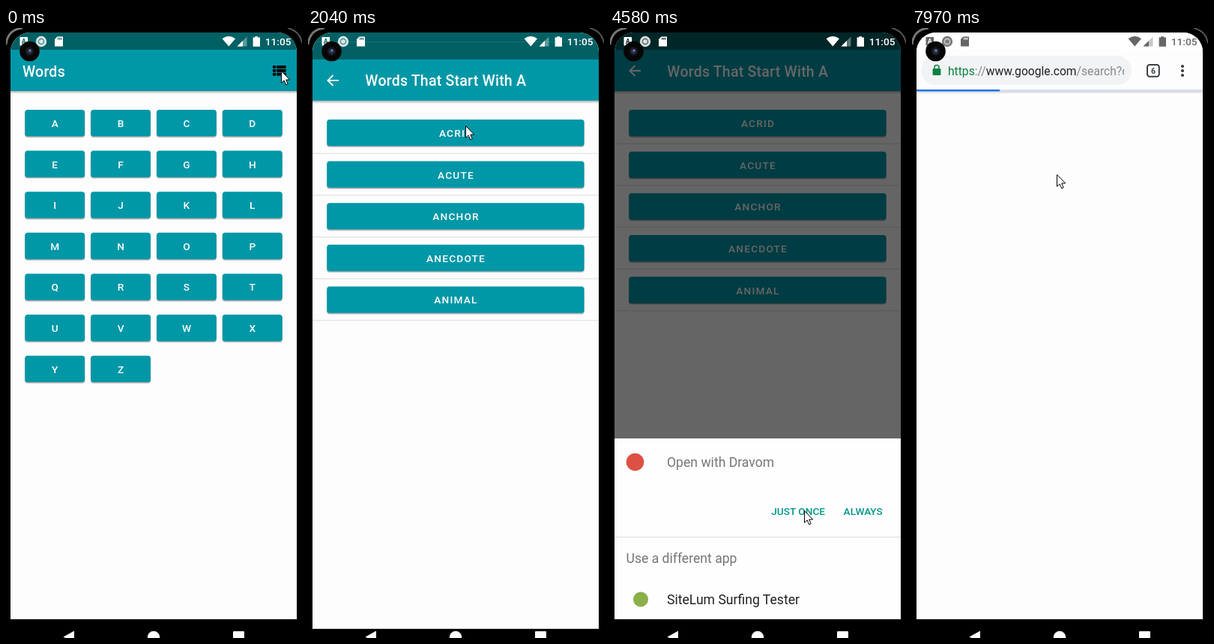
An HTML page that plays this animation: 395 px wide and 813 px high, repeating every 8 s.

```html
<!DOCTYPE html>
<html lang="en">
<head>
<meta charset="utf-8">
<title>Words app</title>
<style>
html, body { margin: 0; width: 100%; height: 100%; overflow: hidden; background: #000; }
svg { display: block; width: 100vw; height: 100vh; }
text { font-family: Roboto, sans-serif; white-space: pre; }
</style>
</head>
<body>
<svg id="stage" viewBox="0 0 395 813">
  <defs>
    <clipPath id="screen"><path d="M6 813V32A26 26 0 0 1 32 6H362A26 26 0 0 1 388 32V813Z"/></clipPath>
    <clipPath id="urlBox"><rect x="20" y="40" width="263" height="34"/></clipPath>
    <linearGradient id="shade" x2="0" y2="1">
      <stop offset="0" stop-color="#000" stop-opacity=".3"/>
      <stop offset="1" stop-color="#000" stop-opacity="0"/>
    </linearGradient>
  </defs>
  <g id="view"></g>
</svg>
<script>
const LOOP = 8000;
const TEAL = '#0097a7', DARK_TEAL = '#006064', PAGE = '#fdfdfd';
const WORDS = ['ACRID', 'ACUTE', 'ANCHOR', 'ANECDOTE', 'ANIMAL'];

const STEPS = [0, 810, 1080, 1230, 1350, 1500, 1650, 1800, 1920, 2040, 2170, 2310, 2430,
  2550, 2670, 3070, 3190, 3320, 3440, 3590, 3740, 3860, 3980, 4100, 4220, 4340, 4460, 4580,
  5390, 5630, 5750, 5890, 6030, 6150, 6280, 6400, 6960, 7110, 7230, 7380, 7500, 7670, 7820, 7970];

// Pointer path: time, x, y
const POINTER = [[0, 367, 57], [1080, 367, 57], [1350, 207, 133], [1500, 206, 132],
  [1650, 206, 131], [1800, 210, 130], [2170, 210, 130], [2430, 232, 162], [2670, 206, 185],
  [3070, 206, 185], [3440, 210, 185], [3590, 210, 221], [4340, 262, 643], [4580, 259, 643],
  [5390, 259, 643], [5750, 257, 643], [6400, 171, 374], [6960, 171, 374], [7230, 173, 367],
  [7500, 178, 339], [7670, 181, 289], [7820, 187, 241], [7970, 193, 195], [8000, 193, 195]];

const clamp = v => Math.max(0, Math.min(1, v));
const ramp = (t, a, b) => clamp((t - a) / (b - a));

const rect = (x, y, w, h, fill, more = '') =>
  `<rect x="${x}" y="${y}" width="${w}" height="${h}" fill="${fill}" ${more}/>`;
const circle = (x, y, r, fill, more = '') =>
  `<circle cx="${x}" cy="${y}" r="${r}" fill="${fill}" ${more}/>`;
const path = (d, fill, more = '') => `<path d="${d}" fill="${fill}" ${more}/>`;
const text = (x, y, size, fill, str, more = '') =>
  `<text x="${x}" y="${y}" font-size="${size}" fill="${fill}" ${more}>${str}</text>`;
const group = (body, more) => `<g ${more}>${body}</g>`;

function pointerAt(t) {
  const i = POINTER.findIndex(p => p[0] > t);
  const [a, b] = [POINTER[i - 1], POINTER[i]];
  const k = ramp(t, a[0], b[0]);
  return [a[1] + (b[1] - a[1]) * k, a[2] + (b[2] - a[2]) * k];
}

function button(x, y, w, label, inner = '') {
  const spacing = 1.22;
  return rect(x - .4, y + 1, w + .8, 36.2, '#000', 'rx="4" opacity=".16"') +
    rect(x, y + .8, w, 35.6, '#000', 'rx="4" opacity=".2"') +
    rect(x, y, w, 35.3, TEAL, 'rx="3.5"') + inner +
    text(x + w / 2 + spacing / 2, y + 23, 13.65, '#fff', label,
      `font-weight="500" text-anchor="middle" letter-spacing="${spacing}"`);
}

// Pressed look of a full-width button: k runs from 0 to 1.
function ripple(y, k, px, py) {
  const white = a => `fill-opacity="${a}"`;
  return `<clipPath id="press"><rect x="25.3" y="${y}" width="343.2" height="35.3" rx="3.5"/></clipPath>` +
    group(rect(25, y, 344, 36, '#fff', white(.25 * clamp(k * 2))) +
      circle(197, y + 18, 136 * k, '#fff', white(.17)) +
      circle(px, py, 74 * k, '#fff', white(.17)), 'clip-path="url(#press)"');
}

function appWindow(title, titleX, icons, body) {
  return rect(6, 6, 382, 782, PAGE) + rect(6, 788, 382, 80, '#000') + body +
    rect(6, 84, 382, 4, 'url(#shade)') +
    rect(6, 6, 382, 23.4, DARK_TEAL) + rect(6, 29, 382, 55, TEAL) +
    text(titleX, 64.5, 19.5, '#fff', title, 'font-weight="500" letter-spacing=".24"') + icons;
}

function gridIcon() {
  let s = '';
  for (let i = 0; i < 6; i++) s += rect(356 + i % 3 * 6.2, i < 3 ? 50 : 57.3, 5.2, 6.2, '#000');
  return s;
}

function listIcon() {
  let s = '';
  for (let i = 0; i < 3; i++)
    s += rect(356, 50 + i * 4.9, 4, 3.8, '#000') + rect(361, 50 + i * 4.9, 12.6, 3.8, '#000');
  return s;
}

function homePage(t) {
  const list = t >= 810;
  let body = '';
  for (let i = 0; i < (list ? 13 : 26); i++) {
    const label = String.fromCharCode(65 + i);
    const pressed = list && !i && t >= 1800 ? ripple(109, ramp(t, 1680, 2160), 204, 130) : '';
    body += list
      ? button(25.3, 109 + i * 54.62, 343.2, label, pressed)
      : button(25.3 + i % 4 * 87.85, 109 + (i >> 2) * 54.62, 79.8, label);
  }
  body += rect(6, 788, 382, 60, '#000');
  const glow = t >= 810 && t < 1080 ? circle(365.5, 56.5, 12.5, '#fff', 'opacity=".12"') : '';
  return appWindow('Words', 22, glow + (list ? gridIcon() : listIcon()), body);
}

function wordsPage(t) {
  let body = '';
  WORDS.forEach((word, i) => {
    const y = 109 + i * 55.65;
    const pressed = i === 1 && t >= 3070 && t < 3440
      ? ripple(y, ramp(t, 2950, 3430), 206, 185) : '';
    body += button(25.3, y, 343.2, word, pressed) + rect(6, y + 44.8, 382, 1, '#dcdcdc');
  });
  const back = path('M41 57H27M33.5 50L26.5 57L33.5 64', 'none', 'stroke="#fff" stroke-width="1.9"');
  return appWindow('Words That Start With A', 76.3, back, body);
}

function sheet(t) {
  const press = t >= 5390 && t < 5630 ? rect(208, 623, 88, 42, '#000', 'rx="3" opacity=".1"') : '';
  const action = (x, label) =>
    text(x, 649.4, 13.65, '#009688', label, 'font-weight="500"');
  return rect(6, 547, 382, 500, '#fefefe') +
    circle(33.5, 578.5, 11.8, '#dd5144') +
    text(76, 585, 17.6, '#757575', 'Open with Dravom') +
    press + action(215.3, 'JUST ONCE') + action(311.6, 'ALWAYS') +
    rect(6, 678, 382, 1, '#dedede') +
    text(21.5, 713, 17.6, '#757575', 'Use a different app') +
    circle(41, 761.5, 10, '#8ab04a') +
    text(76, 767.5, 17.6, '#212121', 'SiteLum Surfing Tester');
}

function address() {
  const part = (fill, s) => `<tspan fill="${fill}">${s}</tspan>`;
  const lock = rect(27.6, 54, 10.8, 9, '#0b8043', 'rx="1.2"') +
    path('M30 55V52.6A3 3 0 0 1 36 52.6V55', 'none', 'stroke="#0b8043" stroke-width="1.5"');
  return lock + group(text(48, 63, 15.65, '#888',
    part('#0b8043', 'https') + part('#888', '://') + part('#222', 'www.google.com') +
    part('#888', '/search?q=')), 'clip-path="url(#urlBox)"');
}

function browser(t) {
  const light = t >= 6960, loading = t >= 7110;
  let s = rect(6, 6, 382, 782, PAGE) + rect(6, 6, 382, 23.4, light ? '#fff' : '#000') +
    rect(6, 788, 382, 80, t < 5890 ? PAGE : '#000');
  if (t < 6030) return s;
  s += rect(6, 84, 382, 4, 'url(#shade)', 'opacity=".6"') +
    rect(12, 37, 281, 39, '#f1f3f4', 'rx="19.5"') +
    (t >= 7820 ? address() : text(25, 63, 15.65, '#6d7074', 'Search or type web address')) +
    rect(314, 49, 15.8, 15.8, 'none', 'rx="3.2" stroke="#3c4043" stroke-width="2"');
  for (const y of [51, 57, 63]) s += circle(361, y, 2.1, '#3c4043');
  if (loading) {
    const end = t < 7230 ? 6 : t < 7820 ? 36 : t < 7970 ? 86 : 117;
    s += text(322, 61, 10.5, '#3c4043', '6', 'font-weight="700" text-anchor="middle"') +
      rect(6, 82, 382, 2.4, '#d3def0') + rect(6, 82, end - 6, 2.4, '#1a73e8');
  }
  return s;
}

// Opening window: rises into place while it quickly turns opaque.
function opening(t, start, body) {
  if (t < start) return '';
  const dy = 68 * Math.pow(1 - ramp(t, start, start + 350), 5);
  return group(body, `transform="translate(0 ${dy.toFixed(2)})" opacity="${ramp(t, start, start + 65)}"`);
}

function statusBar(t) {
  const fg = t < 6960 ? '#fff' : t < 7110 ? '#8a8a8a' : '#666';
  const bg = t < 3740 ? DARK_TEAL : t < 5890 ? '#00262a' : t < 6960 ? '#000' : '#fff';
  return rect(18.5, 12, 10.6, 11.5, fg, 'rx="1"') +
    text(23.8, 21, 9, bg, 'A', 'font-weight="700" text-anchor="middle"') +
    circle(47, 18, 7.2, fg, 'opacity=".85"') +
    circle(47, 18, 3.6, 'none', `stroke="${bg}" stroke-width="1.6" opacity=".6"`) +
    path('M68.5 11.5H76V24.5H65V15Z', fg) +
    rect(69, 13, 1.2, 2.6, bg) + rect(71, 13, 1.2, 2.6, bg) + rect(73, 13, 1.2, 2.6, bg) +
    path('M288.6 14.2Q297.3 7.8 306 14.2L297.3 24.6Z', fg) +
    path('M321.5 11.5V24.5H308.5Z', fg, 'opacity=".35"') +
    path('M316 17V24.5H308.5Z', fg) +
    path('M332.3 11.2H336V12.6H339V24.8H329.6V12.6H332.3Z', fg) +
    text(345.8, 23, 13.7, fg, '11:05', 'font-weight="500"');
}

function device() {
  return path('M0 22Q2 2 22 0', 'none', 'stroke="#777" stroke-width="3"') +
    path('M376 0Q392 4 395 20', 'none', 'stroke="#555" stroke-width="2"') +
    circle(31.5, 31, 13.3, '#060606') + circle(31.5, 31, 6, '#15161c') +
    circle(31.5, 31, 3.4, '#2c3350') + circle(32, 30, 1.3, '#8a90b5') +
    path('M76.5 811.5L91 803.5V819.5Z', '#fff') + circle(197, 812, 8.2, '#fff') +
    rect(303, 804, 15, 16, '#fff', 'rx="1"');
}

function pointer(t) {
  const [x, y] = pointerAt(t);
  return path('M.5 .5V16.2L4.1 12.9L6.7 18.8L9.2 17.7L6.7 12H11.7Z', '#fff',
    `stroke="#000" stroke-width="1" transform="translate(${x.toFixed(1)} ${y.toFixed(1)})"`);
}

function scene(t) {
  let s = '';
  if (t < 2170) s += homePage(t);
  if (t < 6030) s += opening(t, 1941, wordsPage(t));
  if (t >= 3740 && t < 6030) {
    const drop = 260 * Math.pow(1 - ramp(t, 3700, 4220), 3);
    s += rect(6, 6, 382, 782, '#000', `opacity="${.6 * ramp(t, 3640, 3960)}"`) +
      group(sheet(t), `transform="translate(0 ${drop.toFixed(1)})"`) +
      rect(6, 788, 382, 40, '#000');
  }
  s += opening(t, 5732, browser(t));
  return group(s + statusBar(t), 'clip-path="url(#screen)"') + device() + pointer(t);
}

const view = document.getElementById('view');
let shown = -1;

function tick(now) {
  const t = now % LOOP;
  const step = STEPS.filter(s => s <= t).pop();
  if (step !== shown) {
    shown = step;
    view.innerHTML = scene(step);
  }
  requestAnimationFrame(tick);
}
tick(0);
</script>
</body>
</html>
```
